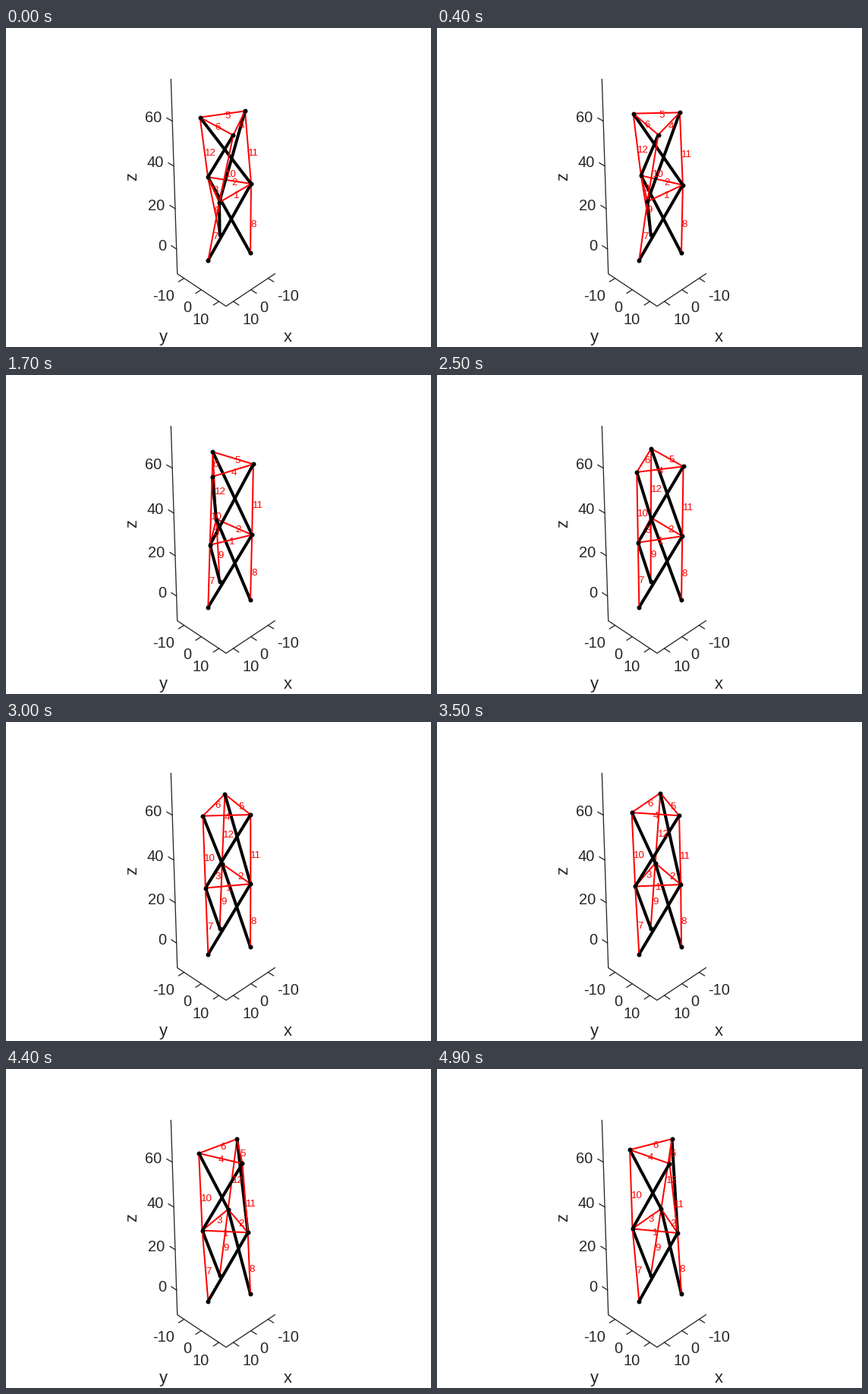
A matplotlib script for the animation above (5000 ms loop, 560 by 420 pixels).

```python
import numpy as np
import matplotlib.pyplot as plt
from matplotlib.animation import FuncAnimation

WIDTH, HEIGHT, DPI = 560, 420, 80
PX = 72 / DPI  # points per pixel
FRAMES, INTERVAL = 50, 100
INK = "#262626"

RADIUS = 10
START_HEIGHT, LIFT_SPEED = 30, 0.5  # height of one stage, and its gain per second
START_TWIST = np.radians(150)
BAR_SQUARED = 2 * RADIUS**2 * (1 - np.cos(START_TWIST)) + START_HEIGHT**2

SIDE, FLOOR, CEILING = 14, -12.8, 77.6  # limits of the axes box
TICK = 3

plt.rcParams["font.family"] = "Liberation Sans"
fig = plt.figure(figsize=(WIDTH / DPI, HEIGHT / DPI), dpi=DPI, facecolor="white")
ax = fig.add_axes([0, 0, 1, 1])
ax.set(xlim=(0, WIDTH), ylim=(HEIGHT, 0))
ax.axis("off")


def nearness(point):
    return np.sum(point) / np.sqrt(3)


def project(point):
    """Perspective view along the diagonal (1, 1, 1), in stage pixels."""
    x, y, z = point
    right = (y - x) / np.sqrt(2)
    up = (2 * z - x - y) / np.sqrt(6)
    scale = 3.3 / (1 - 0.00225 * nearness(point))
    return 290 + right * scale, 210 + (24.55 - up) * scale


def write(x, y, s, size, color=INK, ha="center", va="baseline", **kw):
    return ax.text(x, y, s, fontsize=size * PX, color=color, ha=ha, va=va, **kw)


def stroke(points, width, color, **kw):
    return ax.plot(*zip(*map(project, points)), color=color, lw=width * PX, **kw)[0]


def tick(value, point, direction, ha, dx, dy):
    point = np.array(point)
    stroke([point, point + TICK * np.array(direction)], 1.3, INK)
    x, y = project(point)
    write(x + dx, y + dy, str(value), 20, ha=ha)


def draw_axes():
    stroke([(SIDE, -SIDE, CEILING), (SIDE, -SIDE, FLOOR), (SIDE, SIDE, FLOOR),
            (-SIDE, SIDE, FLOOR)], 1.3, INK, solid_joinstyle="miter")
    for value in (0, 20, 40, 60):
        tick(value, (SIDE, -SIDE, value), (0, -1, 0), "right", -13.5, 1.7)
    for value in (-10, 0, 10):
        tick(value, (SIDE, value, FLOOR), (1, 0, 0), "right", -13, 29.5)
        tick(value, (value, SIDE, FLOOR), (0, 1, 0), "left", 12, 29.5)
    write(371.5, 413, "x", 22)
    write(207.5, 413, "y", 22)
    write(166.5, 195.8, "z", 22, va="center", rotation=90)


# A node is (level, index): three levels of three nodes each
BARS = [((level, i), (level + 1, i)) for level in (0, 1) for i in range(3)]
RINGS = [((level, (i - level) % 3), (level, (i - level + 1) % 3))
         for level in (1, 2) for i in range(3)]
SIDES = [((level, (i - level) % 3), (level + 1, (i - level - 1) % 3))
         for level in (0, 1) for i in range(3)]
CABLES = RINGS + SIDES


def tower(t):
    """Node positions while the stages rise and untwist on bars of fixed length."""
    height = START_HEIGHT + LIFT_SPEED * t
    twist = np.arccos(1 - (BAR_SQUARED - height**2) / (2 * RADIUS**2))
    nodes = {}
    for level in range(3):
        for i in range(3):
            angle = level * twist + i * 2 * np.pi / 3
            nodes[level, i] = np.array([RADIUS * np.cos(angle),
                                        RADIUS * np.sin(angle), level * height])
    return nodes


draw_axes()
origin = [(0, 0, 0)]
bars = [stroke(origin, 4, "black", solid_capstyle="butt") for _ in BARS]
cables = [stroke(origin, 2, "red", solid_capstyle="butt") for _ in CABLES]
joints = ax.plot([], [], "o", color="black", ms=6 * PX, mew=0, zorder=200)[0]
labels = [write(0, 0, str(k + 1), 13.3, "red", ha="left", zorder=201)
          for k in range(len(CABLES))]


def update(frame):
    nodes = tower(frame * INTERVAL / 1000)
    for line, (i, j) in zip(bars + cables, BARS + CABLES):
        line.set_data(*zip(project(nodes[i]), project(nodes[j])))
        line.set_zorder(100 + nearness((nodes[i] + nodes[j]) / 2))
    for label, (i, j) in zip(labels, CABLES):
        # each number sits a little closer to the first node of its cable
        x, y = project(0.55 * nodes[i] + 0.45 * nodes[j])
        label.set_position((x, y + 5.7))
    joints.set_data(*zip(*map(project, nodes.values())))
    return bars + cables + [joints] + labels


anim = FuncAnimation(fig, update, frames=FRAMES, interval=INTERVAL,
                     repeat=True, repeat_delay=0)
plt.show()
```
